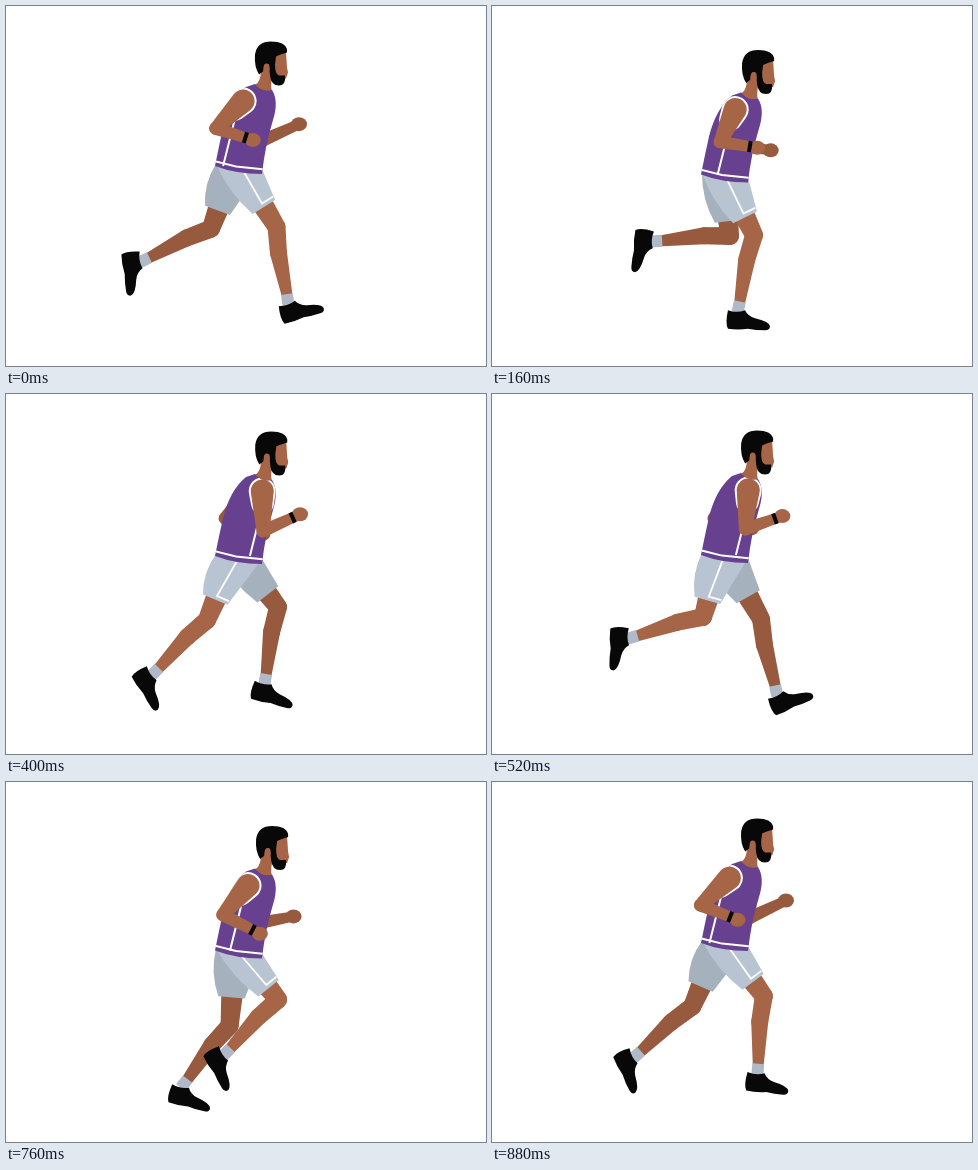
Write an HTML page with a canvas that moves like this. It is 480x360 px and loops after 0.96 s.

```html
<!DOCTYPE html>
<html lang="en">
<head>
<meta charset="utf-8">
<title>Runner</title>
<style>
html, body { margin: 0; width: 100%; height: 100%; overflow: hidden; background: #fff; }
canvas { display: block; }
</style>
</head>
<body>
<canvas id="stage" width="480" height="360"></canvas>
<script>
const ctx = document.getElementById('stage').getContext('2d');
const LOOP = 960;
const TICK = 40;
const SHIN = 77, SHORTS = 42;
const PURPLE = '#67408f', BLACK = '#080808', SOCK = '#b0b9c8';
const NEAR = { skin: '#a66547', cloth: '#b8c4d2' };
const FAR = { skin: '#985a3e', cloth: '#a6b1be' };

// Poses sit on a 60 ms grid with one short and one long gap; they show on 40 ms ticks.
const poses = [0];
for (let p = 40; p <= 520; p += 60) poses.push(p);
for (let p = 600; p <= 900; p += 60) poses.push(p);

// Stride key poses, evenly spaced from 40 ms: knee x, knee y, shin angle, foot angle
const STRIDE = [
  [269, 225, 12, -26],
  [262, 229, -12, 0],
  [229, 245, -36, 6],
  [201, 226, -45, 55],
  [211, 223, -74, 89],
  [238, 230, -86, 94],
  [270, 219, -51, 65],
  [272, 213, -10, 12]
];

const shirt = new Path2D('M240 81L249 78Q256 87 266 84Q273 95 267 114Q259 140 256 168Q230 168 209 160Q213 140 217 122Q224 94 240 81Z');
const neck = new Path2D('M255 58L268 58L266 72Q264 82 267 88L250 88L248 79Q256 77 255 58Z');
const face = new Path2D('M267 46L280 46L281 61L282 66L280 72L268 72Z');
const hair = new Path2D('M253 68Q248 60 249 48Q251 35 265 35Q279 35 281 43L281 46Q274 48 270 50L269 58Q269 68 273 69L279 69Q280 79 273 79Q265 79 264 69L263 58Q258 56 257 65Z');
const shoe = new Path2D('M-10 0Q-1 3 7 0Q10 6 17 8Q31 11 32 16Q32 20 27 20Q18 20 10 18.5Q0 20 -10 18.5Q-13 13 -10 0Z');

const point = (x, y) => ({ x, y });
const mix = (a, b, f) => point(a.x + (b.x - a.x) * f, a.y + (b.y - a.y) * f);
const shift = (p, n, d) => point(p.x + n.x * d, p.y + n.y * d);
const radians = degrees => degrees * Math.PI / 180;
const distance = (a, b) => Math.hypot(b.x - a.x, b.y - a.y);

// Cosine over one loop, highest at the given time
const wave = (time, peak) => Math.cos(2 * Math.PI * (time - peak) / LOOP);
const bounce = time => 5.3 * (1 - wave(2 * time, -20));

function normal(a, b) {
  const d = distance(a, b);
  return point((a.y - b.y) / d, (b.x - a.x) / d);
}

// Smooth periodic curve through the stride poses
function stride(time) {
  const n = STRIDE.length;
  const place = ((time - 40 + LOOP) % LOOP) / LOOP * n;
  const i = Math.floor(place), u = place - i;
  const [before, from, to, after] = [-1, 0, 1, 2].map(k => STRIDE[(i + k + n) % n]);
  return from.map((b, k) => {
    const c = to[k], m1 = (c - before[k]) / 2, m2 = (after[k] - b) / 2;
    return b + u * (m1 + u * (3 * (c - b) - 2 * m1 - m2 + u * (2 * (b - c) + m1 + m2)));
  });
}

function fill(path, color) {
  ctx.fillStyle = color;
  ctx.fill(path);
}

function stroke(points, color, width) {
  ctx.beginPath();
  points.forEach(p => ctx.lineTo(p.x, p.y));
  ctx.strokeStyle = color;
  ctx.lineWidth = width;
  ctx.stroke();
}

function disc(p, rx, ry, color) {
  ctx.beginPath();
  ctx.ellipse(p.x, p.y, rx, ry, 0, 0, 2 * Math.PI);
  ctx.fillStyle = color;
  ctx.fill();
}

// Outline around two circles of different size
function taper(a, b, ra, rb, color) {
  const angle = Math.atan2(b.y - a.y, b.x - a.x);
  const spread = Math.acos((ra - rb) / distance(a, b));
  ctx.beginPath();
  ctx.arc(a.x, a.y, ra, angle + spread, angle - spread + 2 * Math.PI);
  ctx.arc(b.x, b.y, rb, angle - spread, angle + spread);
  ctx.closePath();
  ctx.fillStyle = color;
  ctx.fill();
}

function drawShorts(hip, knee, bob, color, stripeX) {
  const side = normal(hip, knee), length = distance(hip, knee);
  const hem = mix(hip, knee, SHORTS / length);
  const back = shift(hem, side, 13.5), front = shift(hem, side, -13);
  const waist = point(210, 158 + bob);
  const seat = shift(mix(waist, back, 0.5), normal(waist, back), 7);

  ctx.beginPath();
  ctx.moveTo(256, 163 + bob);
  ctx.lineTo(front.x, front.y);
  ctx.lineTo(back.x, back.y);
  ctx.quadraticCurveTo(seat.x, seat.y, waist.x, waist.y);
  ctx.fillStyle = color;
  ctx.fill();

  if (stripeX) {
    const trim = mix(hip, knee, (SHORTS - 4) / length);
    stroke([point(stripeX, 166 + bob), trim, shift(trim, side, -13)], '#fff', 1.8);
  }
}

function drawLeg(time, bob, { skin, cloth }, stripeX) {
  const [x, y, swing, turn] = stride(time);
  const knee = point(x, y);
  const hip = point(230 + (x - 230) * 0.15, 165 + bob);
  const down = point(Math.sin(radians(swing)), Math.cos(radians(swing)));
  const ankle = shift(knee, down, SHIN), sockTop = shift(knee, down, SHIN - 9);
  const calf = shift(shift(knee, down, 26), normal(knee, ankle), 2);

  taper(hip, knee, 13, 9, skin);
  taper(knee, calf, 9, 8.5, skin);
  taper(calf, sockTop, 8.5, 5.5, skin);
  stroke([sockTop, shift(ankle, down, 2)], SOCK, 12);

  ctx.save();
  ctx.translate(ankle.x, ankle.y);
  ctx.rotate(radians(turn));
  fill(shoe, BLACK);
  ctx.restore();
  drawShorts(hip, knee, bob, cloth, stripeX);
}

function armPose(time, bob, offset, reach) {
  const forward = -wave(time, -50);
  return {
    elbow: point(233 + offset + reach * forward, 128.5 + 6.5 * forward + bob),
    hand: point(270 + offset + reach * forward, 126 + 10 * wave(time, 860) + 2 * bob)
  };
}

function drawArm({ elbow, hand }, shoulder, width, skin) {
  taper(shoulder, elbow, width, 6.5, skin);
  taper(elbow, hand, 6.5, 5, skin);
  disc(hand, 8, 7, skin);
}

function drawBand({ elbow, hand }) {
  const wrist = mix(elbow, hand, 0.8), side = normal(elbow, hand);
  stroke([shift(wrist, side, -5.5), shift(wrist, side, 5.5)], BLACK, 4);
}

function drawShirt(bob, twist, shoulder, elbow) {
  const seam = 231 + 14 * twist;
  ctx.save();
  ctx.translate(0, bob);
  fill(neck, NEAR.skin);
  fill(shirt, PURPLE);
  ctx.clip(shirt);
  stroke([point(208, 155), point(230, 160.5), point(259, 163.5)], '#fff', 2);
  stroke([point(seam + 12, 112), point(seam, 160)], '#fff', 2);
  ctx.translate(0, -bob);
  taper(shoulder, mix(shoulder, elbow, 0.3), 13.5, 11.5, '#fff');
  ctx.restore();
}

function drawHead(bob) {
  ctx.save();
  ctx.translate(bob * 0.13, bob + 0.4);
  fill(face, NEAR.skin);
  fill(hair, BLACK);
  disc(point(260.5, 61.5), 3, 4.5, NEAR.skin);
  ctx.restore();
}

function draw(time) {
  const bob = bounce(time);
  const twist = -wave(time, -20);
  const shoulder = point(247 + 10 * twist, 95 + bob);
  const farShoulder = point(249 - 8 * twist, 98 + bob);
  const arm = armPose(time, bob, 0, 24.5);
  const farArm = armPose(time + LOOP / 2, bob, 5, 19);

  ctx.fillStyle = '#fff';
  ctx.fillRect(0, 0, 480, 360);
  drawArm(farArm, farShoulder, 9, FAR.skin);
  drawLeg(time + LOOP / 2, bob, FAR);
  drawLeg(time, bob, NEAR, 234 - 4 * twist);
  drawShirt(bob, twist, shoulder, arm.elbow);
  drawHead(bob);
  drawArm(arm, shoulder, 11.5, NEAR.skin);
  drawBand(arm);
}

const start = performance.now();
function frame() {
  const t = (performance.now() - start) % LOOP;
  draw(poses.findLast(p => Math.floor(p / TICK) * TICK <= t));
  requestAnimationFrame(frame);
}
frame();
</script>
</body>
</html>
```
